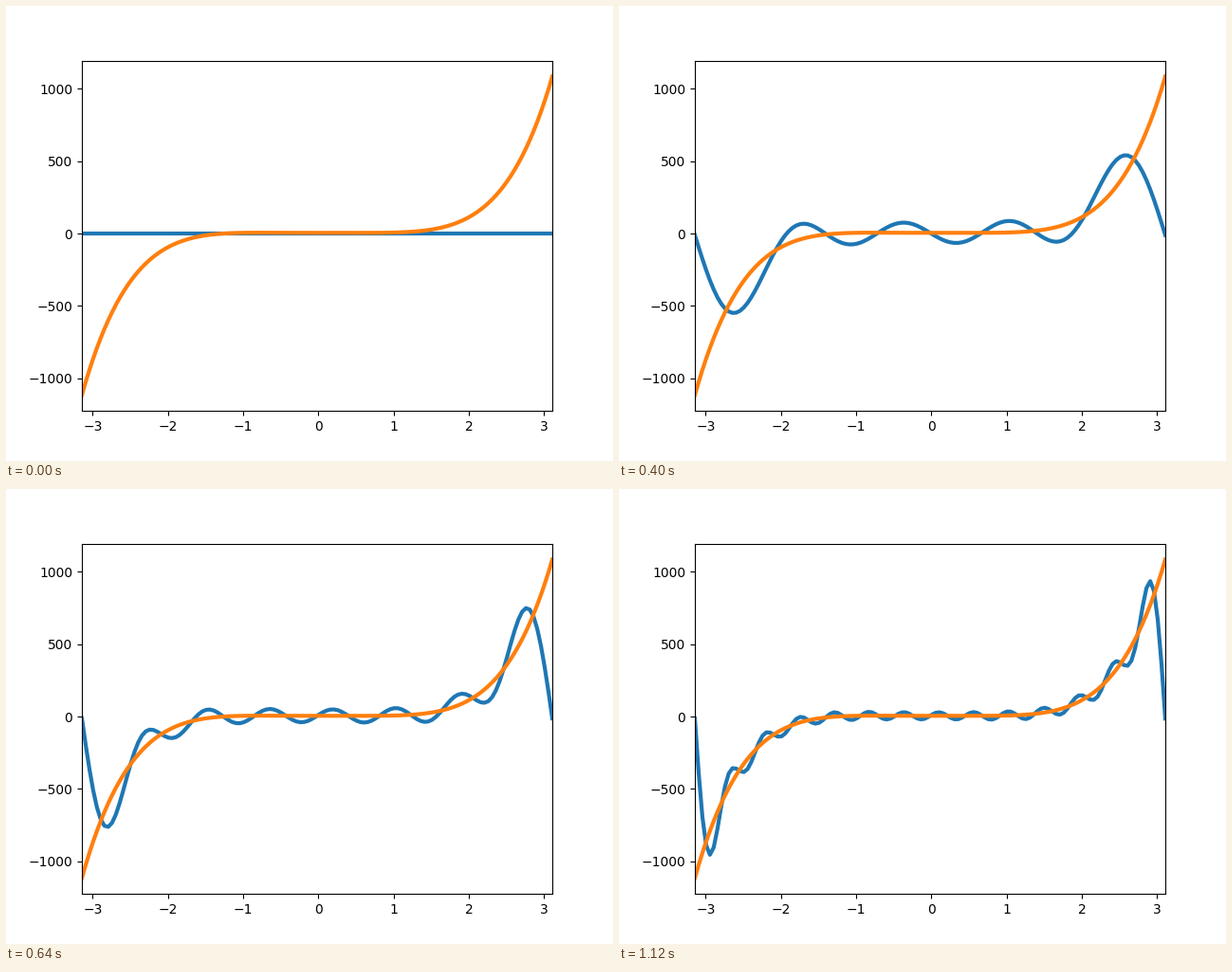
Write a matplotlib script that moves like this. It is 640 px wide and 480 px high and loops after 1200 ms.

```python
import numpy as np
import matplotlib.pyplot as plt
from matplotlib.animation import FuncAnimation

FRAMES = 15
INTERVAL = 80
STEP = 0.05


def f(x):
    return 4 * x**5 - 3 * x**3 + x**2 + 5


x = np.arange(-np.pi, np.pi, STEP)
y = f(x)
period = x[-1] - x[0]


def integrate(values):
    """Trapezoidal rule on the sample grid."""
    return STEP * (values.sum() - (values[0] + values[-1]) / 2)


def harmonic(k):
    """The k-th term of the Fourier series of f."""
    if k == 0:
        return np.full_like(x, integrate(y) / period)
    w = 2 * np.pi * k / period
    c, s = np.cos(w * x), np.sin(w * x)
    return 2 / period * (integrate(y * c) * c + integrate(y * s) * s)


def partial_sum(n):
    return sum((harmonic(k) for k in range(n)), np.zeros_like(x))


fig, ax = plt.subplots(figsize=(6.4, 4.8), dpi=100)
series, = ax.plot(x, partial_sum(0), lw=3, color="tab:blue")
ax.plot(x, y, lw=3, color="tab:orange")
ax.set_xlim(x[0], x[-1])
pad = 0.05 * (y.max() - y.min())
ax.set_ylim(y.min() - pad, y.max() + pad)


def update(n):
    series.set_ydata(partial_sum(n))
    return series,


anim = FuncAnimation(fig, update, frames=FRAMES, interval=INTERVAL,
                     repeat=True, repeat_delay=0)
plt.show()
```
